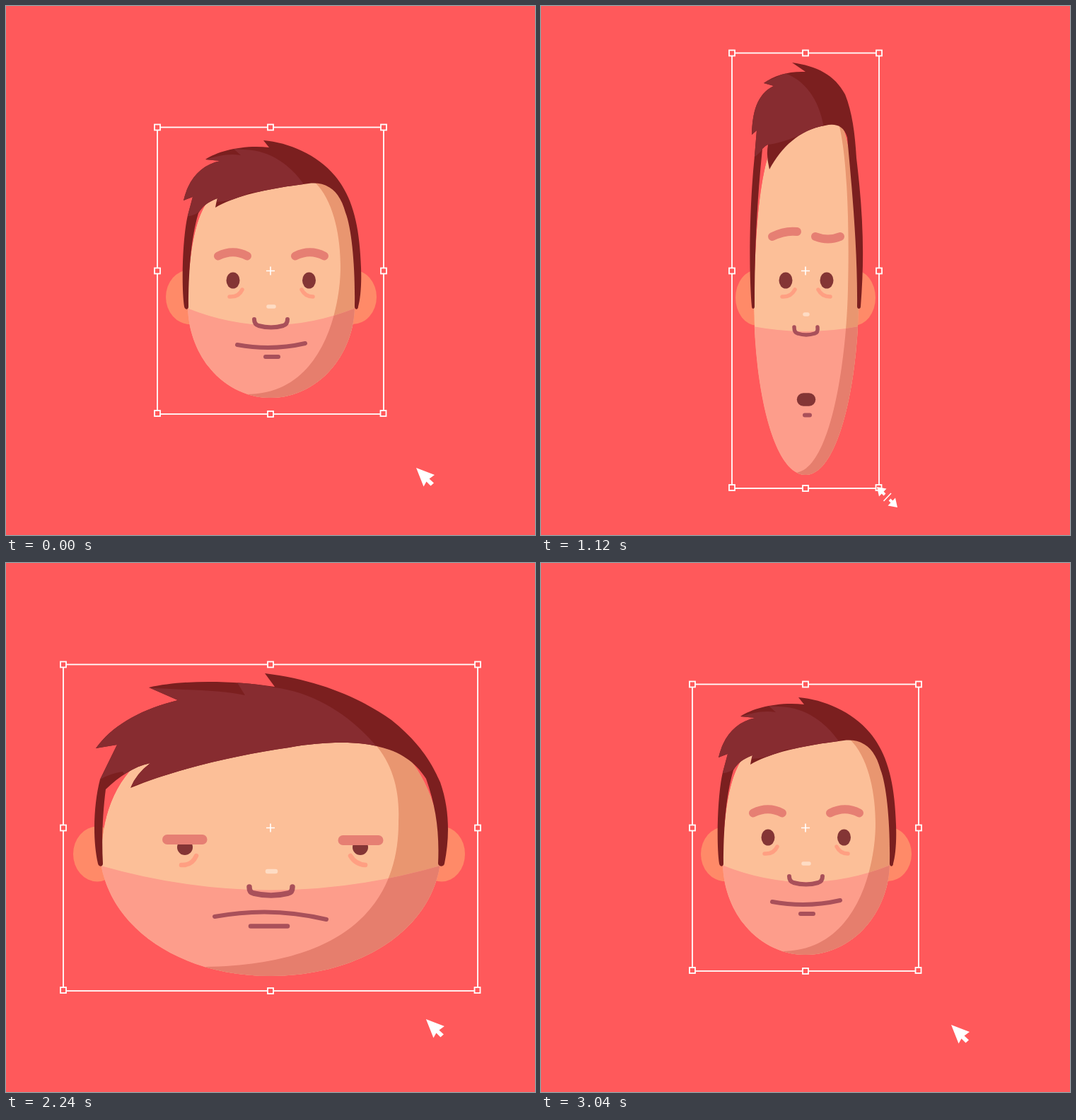
Animation, 748 px wide and 748 px high, one loop 3080 ms. Source, as an HTML page:

```html
<!DOCTYPE html>
<html lang="en">
<head>
<meta charset="utf-8">
<title>Resizable face</title>
<style>
  html, body { margin: 0; width: 100%; height: 100%; overflow: hidden; background: #ff595b; }
  svg { display: block; width: 100%; height: 100%; }
  .line { fill: none; stroke-linecap: round; stroke-linejoin: round; }
  .brow { stroke: #e67f73; }
  .bag { stroke: #ff9f82; }
  .eye { fill: #843535; }
  .nose { stroke: #a9505a; }
  .ear { fill: #ff8a68; }
  .ui { fill: none; stroke: #fff; }
</style>
</head>
<body>
<svg viewBox="0 0 748 748">
  <defs>
    <clipPath id="faceClip"><path data-part="face"/></clipPath>
    <clipPath id="beardClip"><path data-part="beard"/></clipPath>
    <clipPath id="hairClip"><path data-part="hair"/></clipPath>
  </defs>
  <ellipse class="ear" data-part="earL"/>
  <ellipse class="ear" data-part="earR"/>
  <g clip-path="url(#faceClip)">
    <path data-part="face" fill="#fcbf98"/>
    <path data-part="shade" fill="#e99670"/>
    <path data-part="beard" fill="#fd9d8b"/>
    <g clip-path="url(#beardClip)"><path data-part="shade" fill="#e67e6d"/></g>
  </g>
  <path data-part="hair" fill="#7b1f1f"/>
  <g clip-path="url(#hairClip)"><path data-part="hairLight" fill="#872c30"/></g>
  <path class="line bag" data-part="bagL"/>
  <path class="line bag" data-part="bagR"/>
  <ellipse class="eye" data-part="eyeL"/>
  <ellipse class="eye" data-part="eyeR"/>
  <path class="line brow" data-part="browL"/>
  <path class="line brow" data-part="browR"/>
  <path class="line" data-part="glint" stroke="#fedcc4"/>
  <path class="line nose" data-part="nose"/>
  <path class="line" data-part="mouth"/>
  <path class="line nose" data-part="chin"/>
  <path class="ui" d="M368 374.5H380M374 368.5V380.5" stroke-width="1.6"/>
  <rect class="ui" id="frame" stroke-width="1.8"/>
  <g id="handles"></g>
  <path id="arrow" fill="#fff" d="M0 0L26 10L18.5 15.5L25 21.5L20.5 25.5L14.5 19.5L10.5 26.5Z"/>
  <g id="resize" fill="#fff" stroke="#fff">
    <path stroke="none" d="M0 0L13.5 2.5L3 13.5ZM29 29L15.5 26.5L26 15.5Z"/>
    <path stroke-width="4" d="M6 6L11 11M23 23L18 18"/>
    <path stroke-width="1.6" d="M9.5 20L20 9"/>
  </g>
</svg>
<script>
const LOOP = 3080;

// Each part: shapes for the normal, tall and wide poses, then optionally the landing pose.
const shapes = {
  face: [
    'M257 425C258 495 308 554 374 554C440 554 492 495 493 425L496 380C490 300 470 240 430 235L300 262C270 280 258 340 257 425Z',
    'M301 425C302 540 328 663 374 663C419 663 447 540 449 425L449 390C447 300 440 180 420 160L330 190C308 230 302 330 301 425Z',
    'M134 425C150 520 250 584 374 584C500 584 600 520 614 425L616 400C612 340 580 260 520 240L200 270C150 310 135 360 134 425Z'],
  shade: [
    'M433 246C468 275 476 345 472 390C466 455 435 552 335 549L335 680L640 680L640 246Z',
    'M419 160C434 205 436 320 434 400C432 500 410 655 360 660L360 680L640 680L640 160Z',
    'M520 254C548 285 557 325 555 365C556 465 500 574 262 571L262 680L640 680L640 254Z'],
  beard: [
    'M256 427Q375 475 494 427L640 700L100 700Z',
    'M300 453Q375 467 449 453L640 700L100 700Z',
    'M134 428Q375 497 614 428L640 700L100 700Z'],
  hair: [
    'M252 425C248 400 249 330 257 296L264 270L251 275C258 245 275 225 303 219L282 217C300 205 335 196 372 200L364 190C400 193 440 210 465 240C490 270 500 310 502 370C503 395 501 415 498 425C498 430 493 430 493 425C494 370 489 315 480 292C472 262 455 248 428 251C370 258 325 268 296 285Q297 278 299 272C285 277 277 284 272 293C261 330 258 380 258 425C258 430 253 430 252 425Z',
    'M298 425C294 380 294 290 302 212L305 176L298 182C299 150 305 125 329 113L315 109C330 98 350 92 374 93L355 80C390 85 415 97 430 125C440 150 444 180 446 215C455 290 458 350 452 425C452 429 447 429 447 425C448 340 438 240 433 186C428 168 415 166 402 169C365 175 340 200 323 231Q318 212 321 196C318 197 316 199 313 202C306 270 302 340 302 425C302 429 298 429 298 425Z',
    'M130 425C122 390 124 340 133 306Q138 283 157 257L127 262C150 230 190 207 243 194L202 176C250 165 320 166 380 175L366 156C440 165 500 190 545 222C590 258 605 290 614 310C628 350 627 390 620 425C619 430 612 430 611 425C613 380 608 345 594 305C578 280 555 266 528 260C500 252 450 252 400 261C330 271 240 291 176 318Q184 298 204 283C180 288 160 302 141 320C137 350 135 390 137 425C137 430 131 430 130 425Z'
      .replace('Q138 283 157 257', 'L157 257'),
    'M134 425C125 390 126 340 135 306L157 258L137 263C160 228 195 208 244 192L208 181C260 165 310 165 372 173L367 153C440 165 490 185 528 208C575 235 600 275 608 300C622 340 624 390 617 425C616 430 609 430 609 425C610 380 607 340 592 305C577 280 555 262 532 257C500 249 450 252 420 256C330 268 250 300 172 332Q178 300 196 284C175 293 160 300 144 317C138 350 136 390 140 425C140 430 135 430 134 425Z'],
  hairLight: [
    'M230 300L257 297Q265 297 273 291L297 277C315 276 330 272 345 264L425 258C400 218 365 203 335 203L322 202L332 211C315 208 298 212 280 218L230 218Z',
    'M280 220L301 214Q306 211 313 203L321 196C340 194 360 185 378 178L400 172C393 130 372 105 345 95L340 94L338 98C335 100 325 103 315 108L280 100Z',
    'M100 312L133 306Q146 298 165 295L178 316C200 308 222 300 245 296L526 262C490 218 440 184 380 176L325 166L338 187C300 179 250 180 196 176L90 176Z',
    'M100 312L135 308Q146 300 155 295L176 330C205 316 235 306 262 297L535 258C490 205 430 180 372 173L330 166L330 185C300 184 260 180 200 180L90 180Z'],
  browL: ['M300 353.5Q321 343 341 353.5', 'M327 326Q345 317 362 319', 'M228 391Q252 391 277.5 391'],
  browR: ['M409 353.5Q430 343 450 353.5', 'M388 326Q406 333 423 326', 'M476.5 392Q502 392 526.5 392'],
  bagL: ['M316 411Q329 412 334 401', 'M341 411Q353 412 359 401', 'M248 427Q263 428 269 414'],
  bagR: ['M418 401Q423 411 434 411', 'M392 401Q397 411 409 411', 'M487 414Q494 426 508 427'],
  glint: ['M371 425L379 425', 'M373 436L377 436', 'M370 436L381 436'],
  nose: [
    'M351 443Q351 450 357 452Q375 457 392 452Q398 450 398 443',
    'M358 454Q358 462 363 463Q375 467 387 463Q392 462 391 454',
    'M344 458Q344 466 350 467Q375 473 399 467Q405 466 405 458'],
  mouth: ['M327 479Q375 488 423 477', 'M371 556.5Q375 556.5 379 556.5', 'M295 500Q375 485 453 504'],
  chin: ['M367 496L385 496', 'M373 578.5L380 578.5', 'M346 513.5L398 513.5']
};

// Ellipses as centre x, centre y, radius x, radius y.
const ovals = {
  earL: ['260 411.5 34 38.5', '306 412.5 31 39.5', '129 411.5 34 39'],
  earR: ['490 411.5 34 38.5', '442 412.5 31 39.5', '616 411.5 33 39'],
  eyeL: ['321 388 9.5 11.5', '346 388 9.5 11.5', '253 402 11 11'],
  eyeR: ['428.5 388 9.5 11.5', '404 388 9.5 11.5', '501 402 11 11']
};

const widths = {
  browL: ['12', '12', '14'], browR: ['12', '12', '14'],
  bagL: ['5.5', '5.5', '6.5'], bagR: ['5.5', '5.5', '6.5'],
  glint: ['5.5', '5.5', '6.5'], nose: ['6', '5.5', '7.5'],
  mouth: ['6', '18.5', '6'], chin: ['6', '6', '6.5']
};

const mouthColor = ['rgb(169,80,90)', 'rgb(132,53,53)', 'rgb(169,80,90)'];
const bounds = ['214 171.5 534 577', '270 66.5 478 682', '81 143.5 667 605', '84.5 142.5 663 606'];

const NORMAL = 0, TALL = 1, WIDE = 2, LAND = 3;
const moves = [
  [0, 640, NORMAL, NORMAL],
  [640, 1120, NORMAL, TALL],
  [1120, 1180, TALL, TALL],
  [1180, 1480, TALL, LAND],
  [1480, 1740, LAND, WIDE],
  [1740, 2380, WIDE, WIDE],
  [2380, 2840, WIDE, NORMAL],
  [2840, LOOP, NORMAL, NORMAL]
];

const NUM = /-?\d+(\.\d+)?/g;
const mix = (a, b, k) => {
  const ends = b.match(NUM);
  let i = 0;
  return a.replace(NUM, n => (+n + (ends[i++] - n) * k).toFixed(2));
};
const easeInOut = (x, p) => x < 0.5 ? (2 * x) ** p / 2 : 1 - (2 - 2 * x) ** p / 2;
const span = (t, a, b) => Math.min(1, Math.max(0, (t - a) / (b - a)));

for (const set of [shapes, ovals, widths, { mouthColor }])
  for (const poses of Object.values(set))
    poses[LAND] ??= mix(poses[TALL], poses[WIDE], 0.983);

const $ = id => document.getElementById(id);
const find = name => document.querySelectorAll(`[data-part="${name}"]`);
const setAll = (el, attrs) => {
  for (const key in attrs) el.setAttribute(key, attrs[key]);
};
const nodes = {};
for (const name of [...Object.keys(shapes), ...Object.keys(ovals)]) nodes[name] = find(name);

const handles = Array.from({ length: 8 }, () => {
  const el = document.createElementNS('http://www.w3.org/2000/svg', 'rect');
  setAll(el, { width: 8, height: 8, fill: '#ff595b', stroke: '#fff', 'stroke-width': 1.8 });
  return $('handles').appendChild(el);
});

function drawFrame([l, t, r, b]) {
  setAll($('frame'), { x: l, y: t, width: r - l, height: b - t });
  const spots = [[l, t], [374, t], [r, t], [l, 374.5], [r, 374.5], [l, b - 1], [374, b], [r - 0.5, b - 1]];
  spots.forEach(([x, y], i) => setAll(handles[i], { x: x - 4, y: y - 4 }));
}

function drawCursor(t, right, bottom) {
  const dragging = t >= 560 && t < 1760;
  const rest = [580, 653];
  let x = right - 3, y = bottom - 2;
  if (!dragging) {
    const back = t >= 1760;
    const from = back ? [666, 603] : rest;
    const to = back ? rest : [531, 575];
    const k = back ? easeInOut(span(t, 1740, 2440), 2) : easeInOut(span(t, 80, 580), 2);
    x = from[0] + (to[0] - from[0]) * k;
    y = from[1] + (to[1] - from[1]) * k;
  }
  $('arrow').style.display = dragging ? 'none' : '';
  $('resize').style.display = dragging ? '' : 'none';
  $(dragging ? 'resize' : 'arrow').setAttribute('transform', `translate(${x} ${y})`);
}

function draw(t) {
  const [start, end, a, b] = moves.find(m => t < m[1]);
  const x = span(t, start, end);
  const k = b === WIDE ? 1 - (1 - x) ** 2 : easeInOut(x, 3);
  const at = poses => mix(poses[a], poses[b], k);

  for (const name in shapes) {
    const d = at(shapes[name]);
    nodes[name].forEach(el => el.setAttribute('d', d));
  }
  for (const name in widths) nodes[name][0].setAttribute('stroke-width', at(widths[name]));
  nodes.mouth[0].setAttribute('stroke', at(mouthColor));

  const lid = 1 - 0.9 * Math.max(0, 1 - Math.abs(t - 340) / 100);
  for (const name in ovals) {
    const [cx, cy, rx, ry] = at(ovals[name]).split(' ');
    setAll(nodes[name][0], { cx, cy, rx, ry: name.startsWith('eye') ? ry * lid : ry });
  }

  const box = at(bounds).split(' ').map(Number);
  drawFrame(box);
  drawCursor(t, box[2], box[3]);
}

const begin = performance.now();
function tick() {
  draw((performance.now() - begin) % LOOP);
  requestAnimationFrame(tick);
}
tick();
</script>
</body>
</html>
```
